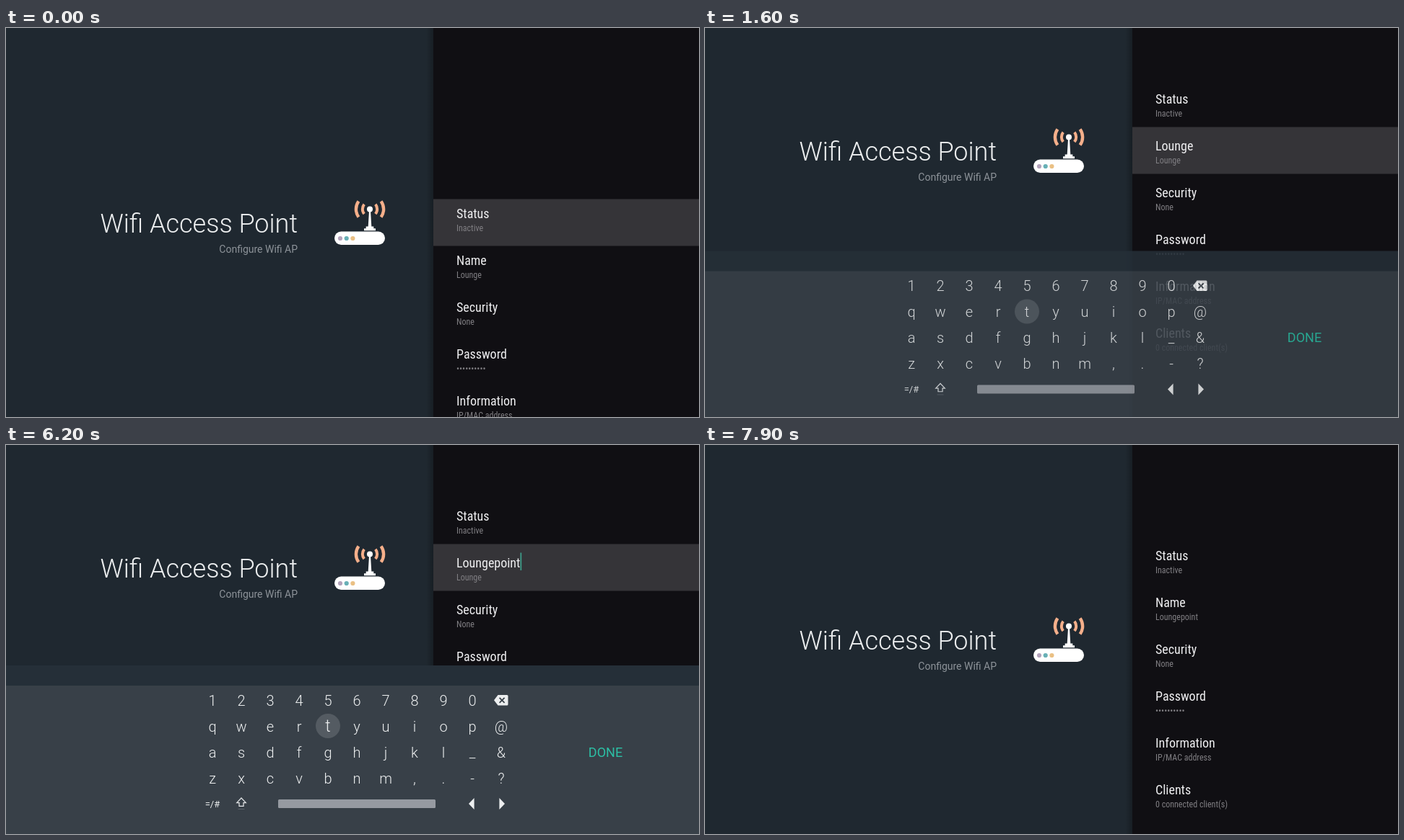
Write an HTML page that moves like this. It is 960x540 px and loops after 8 s.

```html
<!DOCTYPE html>
<html lang="en">
<head>
<meta charset="utf-8">
<title>Wifi Access Point</title>
<style>
html, body { margin: 0; width: 100%; height: 100%; overflow: hidden; background: #1f2830; }
svg { display: block; width: 960px; height: 540px; font-family: Roboto, sans-serif; }
#list text { font-family: "Roboto Condensed", Roboto, sans-serif; font-stretch: 75%; }
.head { font-size: 18px; fill: #eeeef0; }
.sub { font-size: 12px; fill: #807f83; }
.key { font-size: 20px; font-weight: 300; fill: #eceeef; text-anchor: middle; }
</style>
</head>
<body>
<svg viewBox="0 0 960 540">
  <defs>
    <linearGradient id="shade"><stop stop-color="#000" stop-opacity="0"/><stop offset="1" stop-color="#000" stop-opacity=".25"/></linearGradient>
  </defs>
  <rect width="960" height="540" fill="#1f2830"/>
  <rect x="582" width="10" height="540" fill="url(#shade)"/>
  <rect x="592" width="368" height="540" fill="#100f13"/>
  <g id="page">
    <g text-anchor="end">
      <text x="404" y="283.5" font-size="36" font-weight="300" fill="#eceeef">Wifi Access Point</text>
      <text x="404" y="312" font-size="14" fill="#8d9399">Configure Wifi AP</text>
    </g>
    <g fill="none" stroke="#f5af8a">
      <path stroke-width="4.4" d="M488.4 240.4a19 19 0 0 0 0 22M519.6 240.4a19 19 0 0 1 0 22"/>
      <path stroke-width="4" d="M496.2 244.8a10.4 10.4 0 0 0 0 13.2M511.8 244.8a10.4 10.4 0 0 1 0 13.2"/>
    </g>
    <g fill="#fff">
      <circle cx="504" cy="251.5" r="4"/>
      <path d="M503 254h2l1.3 21.5h3v2.7h2.7v3h-16v-3h2.7v-2.7h3z"/>
      <rect x="455" y="282.5" width="70" height="18.5" rx="9.25"/>
    </g>
    <circle cx="463" cy="292" r="3.1" fill="#b3a3bb"/>
    <circle cx="471.7" cy="292" r="3.1" fill="#68b0b6"/>
    <circle cx="480.4" cy="292" r="3.1" fill="#eac084"/>
    <rect id="band" x="592" y="237.5" width="368" height="65" fill="#353438"/>
    <g id="list"></g>
    <rect id="caret" y="249.5" width="1.8" height="24.5" fill="#3d9c88"/>
  </g>
  <g id="board">
    <rect y="306" width="960" height="290" fill="#252f38"/>
    <rect y="334" width="960" height="262" fill="#384048"/>
    <rect id="focus" fill="#fff" fill-opacity=".14"/>
    <g id="keys"></g>
    <path fill="#eceeef" d="M676 354.3l5.5-7.3h12.5q1.5 0 1.5 1.5v11.5q0 1.5-1.5 1.5h-12.5z"/>
    <path stroke="#384048" stroke-width="1.8" d="M683.6 350.8l7 7m0-7l-7 7"/>
    <text class="key" x="286" y="502.5" style="font-size:13px;font-weight:400">=/#</text>
    <path fill="none" stroke="#e4e6e8" stroke-width="1.2" d="M326 490l6.3 6.7h-3.3v4.6h-6v-4.6h-3.3z"/>
    <path stroke="#596169" d="M321.500 505.500h9"/>
    <rect x="377" y="492" width="218" height="12" rx="1.500" fill="#969aa1"/>
    <path fill="#eceeef" d="M641 498l7.600-8v16zM691 498l-7.600-8v16z"/>
    <text id="done" x="830.500" y="433" font-size="18" text-anchor="middle">DONE</text>
  </g>
</svg>
<script>
const $ = id => document.getElementById(id);
const LOOP = 8000, PITCH = 65;
const OLD = "Lounge", ENDING = "point", NEW = OLD + ENDING;
const TYPED = [3000, 3500, 4100, 4900, 6200];
const EDIT = 1200, SAVED = 7200;

function add(parent, name, attrs, text = "") {
  const el = document.createElementNS("http://www.w3.org/2000/svg", name);
  for (const k in attrs) el.setAttribute(k, attrs[k]);
  el.textContent = text;
  return parent.appendChild(el);
}

const rows = [
  ["Status", "Inactive"], ["Name", OLD], ["Security", "None"], ["Password", "•".repeat(10)],
  ["Information", "IP/MAC address"], ["Clients", "0 connected client(s)"]
].map(([head, sub], i) => [
  add($("list"), "text", { class: "head", x: 624, y: 264 + i * PITCH }, head),
  add($("list"), "text", { class: "sub", x: 624, y: 282 + i * PITCH }, sub)
]);
const [nameHead, nameSub] = rows[1];

const keys = {};
["1234567890", "qwertyuiop@", "asdfghjkl_&", "zxcvbnm,.-?"].forEach((row, r) =>
  [...row].forEach((ch, c) => {
    const x = 286 + 40 * c, y = 362 + 36 * r;
    keys[ch] = { x, y: y - 8, w: 34, h: 34, el: add($("keys"), "text", { class: "key", x, y }, ch) };
  }));
keys.done = { x: 830, y: 426, w: 81, h: 30 };

// key, time of arrival
const route = [
  ["t", 0], ["y", 2150], ["u", 2250], ["i", 2350], ["o", 2450], ["p", 2600],
  ["o", 3350], ["i", 3800], ["u", 4430], ["y", 4560], ["h", 4720], ["n", 4860],
  ["h", 5680], ["y", 5820], ["t", 5980], ["y", 6450], ["u", 6540], ["i", 6630],
  ["o", 6720], ["p", 6810], ["@", 6900], ["done", 7000]
];

const ramp = (t, a, b) => Math.min(1, Math.max(0, (t - a) / (b - a)));
const easeOut = (p, n = 2) => 1 - (1 - p) ** n;
const smooth = p => p * p * (3 - 2 * p);
const mix = (a, b, p) => a + (b - a) * p;
const move = (id, y) => $(id).setAttribute("transform", `translate(0 ${y})`);

function drawPage(t) {
  const up = smooth(ramp(t, 1150, 1500)) - smooth(ramp(t, 7230, 7560));
  const scroll = 59.5 * easeOut(ramp(t, 200, 600)) + 65 * easeOut(ramp(t, 7700, 8155));
  move("page", -100 * up);
  move("list", -scroll);
  $("band").setAttribute("opacity", t < 100 ? 1 : t < 7750 ? ramp(t, 700, 950) : 0);

  const editing = t >= EDIT && t < SAVED;
  const count = TYPED.filter(at => t >= at).length;
  nameHead.textContent = editing ? OLD + ENDING.slice(0, count) : "Name";
  nameSub.textContent = t < SAVED ? OLD : NEW;

  const since = t - (count ? TYPED[count - 1] : 1600);
  const on = editing && t > 1650 && since % 1000 < 500;
  $("caret").setAttribute("opacity", on ? 1 : 0);
  if (on) $("caret").setAttribute("x", 624 + nameHead.getComputedTextLength());
}

function drawFocus(t) {
  let i = route.length - 1;
  while (i > 0 && t < route[i][1] - 120) i--;
  const to = keys[route[i][0]], from = keys[route[Math.max(0, i - 1)][0]];
  const span = i ? Math.min(120, route[i][1] - route[i - 1][1]) : 1;
  const p = ramp(t, route[i][1] - span, route[i][1]);
  const [x, y, w, h] = ["x", "y", "w", "h"].map(k => mix(from[k], to[k], p));
  const box = { x: x - w / 2, y: y - h / 2, width: w, height: h, rx: h / 2 };
  for (const k in box) $("focus").setAttribute(k, box[k]);

  for (const k in keys) if (keys[k].el) keys[k].el.style.fontSize = "";
  const grow = 3 * p * ramp(t, 1600, 1800);
  if (to.el) to.el.style.fontSize = 20 + grow + "px";
  $("done").setAttribute("fill", to === keys.done ? "#37d3b5" : "#2cbfa5");
}

function drawBoard(t) {
  const enter = ramp(t, 1400, 1750), leave = ramp(t, 7320, 7580);
  move("board", 45 * (1 - enter) ** 3 + 45 * leave * leave);
  $("board").setAttribute("opacity", Math.min(1, enter * 1.5) * (1 - leave));
  drawFocus(t);
}

const start = performance.now();
function frame() {
  const t = (performance.now() - start) % LOOP;
  drawPage(t);
  drawBoard(t);
  requestAnimationFrame(frame);
}
frame();
</script>
</body>
</html>
```
